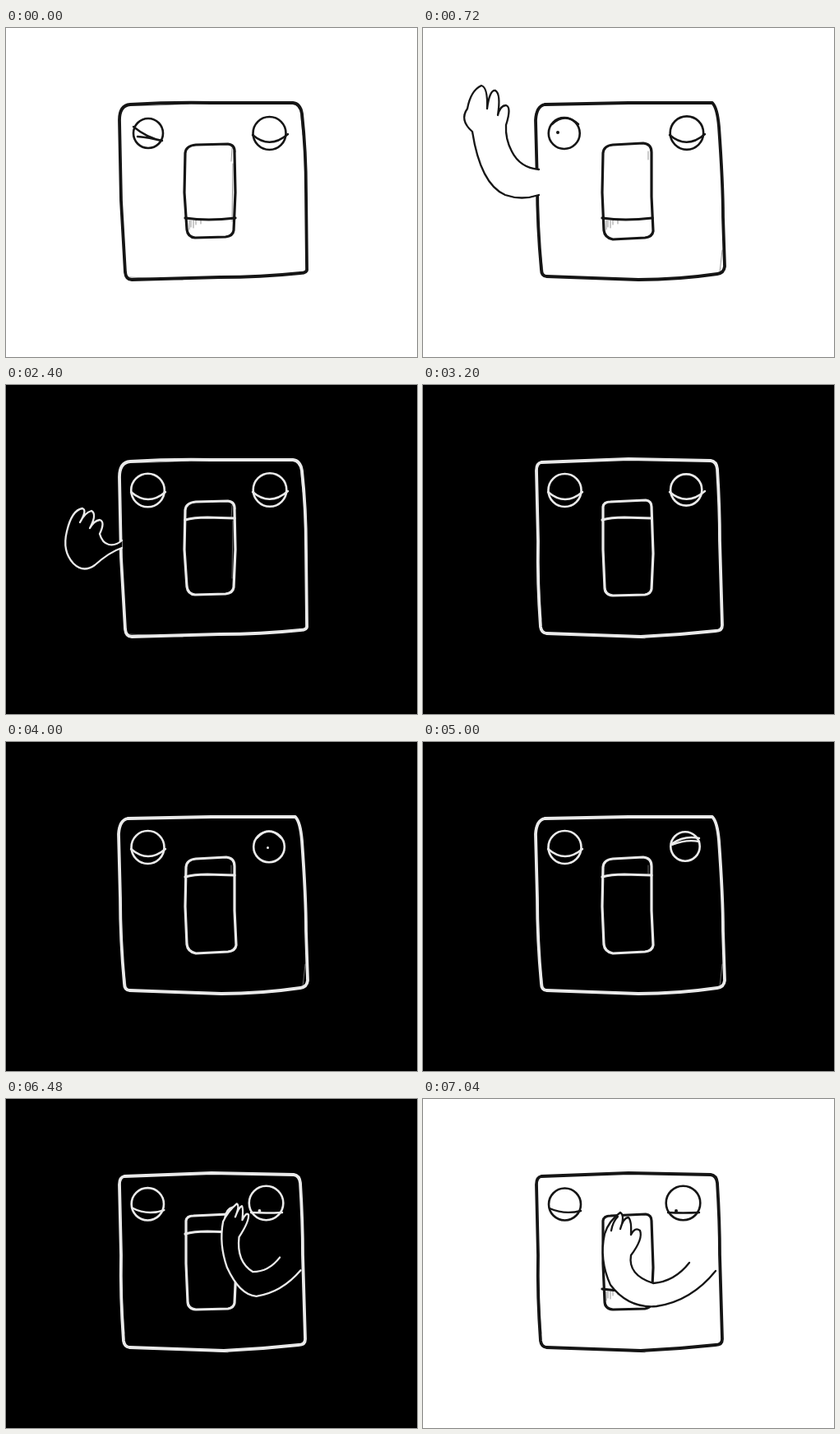
These frames come from a looping animation (500 px wide and 400 px high, 7.08 s). An HTML page without scripts:

```html
<!DOCTYPE html>
<html lang="en">
<head>
<meta charset="utf-8">
<title>Light switch</title>
<style>
html, body { margin: 0; width: 100%; height: 100%; overflow: hidden; background: #fff; }
svg { display: block; width: 500px; height: 400px; animation: light 7.08s step-end infinite; }
path, circle { fill: none; stroke: #151515; stroke-linecap: round; stroke-linejoin: round; }

/* room light and rocker */
@keyframes light { 0% { filter: invert(0) } 15.25% { filter: invert(1) } 95.48% { filter: invert(0) } }
@keyframes on { 0% { opacity: 1 } 15.25% { opacity: 0 } 95.48% { opacity: 1 } }
@keyframes off { 0% { opacity: 0 } 15.25% { opacity: 1 } 95.48% { opacity: 0 } }
.on { animation: on 7.08s step-end infinite; }
.off { animation: off 7.08s step-end infinite; }

/* three drawings of the plate take turns, 13 rounds per loop */
.plate { stroke-width: 3.8; }
.rocker { stroke-width: 3.2; }
.faint { stroke-width: 1; opacity: .45; }
.a, .b, .c { animation: a calc(7.08s / 13) step-end infinite; }
.b { animation-name: b; }
.c { animation-name: c; }
@keyframes a { 0% { opacity: 1 } 13% { opacity: 0 } 37.5% { opacity: 1 } 82% { opacity: 0 } }
@keyframes b { 0% { opacity: 0 } 13% { opacity: 1 } 37.5% { opacity: 0 } }
@keyframes c { 0% { opacity: 0 } 82% { opacity: 1 } }

/* eyes */
.ball { stroke-width: 2.6; }
.lid { stroke-width: 2.4; }
.dot { fill: #151515; stroke: none; r: 2px; }
.left {
  --shut: path("M152,130 Q173,148 194,130 M152,130 Q173,148 194,130");
  --open: path("M157,117 Q173,102 189,117 M157,117 Q173,102 189,117");
}
.right {
  --shut: path("M300,130 Q321,148 343,129 M300,130 Q321,148 343,129");
  --open: path("M305,117 Q320,100 335,117 M305,117 Q320,100 335,117");
}
.left .ball { animation: lball 7.08s infinite; }
.left .lid { animation: llid 7.08s infinite; }
.left .dot { animation: ldot 7.08s infinite; }
.right .ball { animation: rball 7.08s infinite; }
.right .lid { animation: rlid 7.08s infinite; }
.right .dot { animation: rdot 7.08s infinite; }

@keyframes lball {
  0% { cx: 173px; cy: 128px; r: 18px }
  19.2% { cx: 171.5px; cy: 128px; r: 19.2px }
  33.9% { cx: 172.5px; cy: 128px; r: 20.3px }
  56.5%, 70.6% { cx: 172.5px; cy: 128px; r: 20px }
  82.5% { cx: 171.5px; cy: 127px; r: 20.5px }
  99.4%, 100% { cx: 172.5px; cy: 128px; r: 19.5px }
}
@keyframes llid {
  0% { d: path("M155,120 Q172,134 190,137 M160,132 Q175,133 188,137") }
  3%, 16% { d: var(--open) }
  19.2% { d: path("M152,126 Q171,131 193,129 M152,126 Q171,131 193,129") }
  22.6%, 82.5% { d: var(--shut) }
  99.4%, 100% { d: path("M154,133 Q172,141 192,136 M154,133 Q172,141 192,136") }
}
@keyframes ldot {
  0%, 1.5% { cx: 173px; cy: 130px; opacity: 0 }
  3% { cx: 173px; cy: 128px; opacity: 1 }
  6%, 11% { cx: 164px; cy: 127px; opacity: 1 }
  15% { cx: 178px; cy: 131px; opacity: 1 }
  19.2%, 20% { cx: 171.5px; cy: 131px; opacity: 1 }
  21%, 100% { cx: 171.5px; cy: 135px; opacity: 0 }
}
@keyframes rball {
  0% { cx: 320.5px; cy: 128px; r: 20px }
  19.2%, 33.9% { cx: 321px; cy: 127.5px; r: 20.3px }
  56.5% { cx: 320px; cy: 127.5px; r: 18.8px }
  70.6% { cx: 319px; cy: 127px; r: 17.7px }
  82.5% { cx: 319.5px; cy: 127px; r: 18.7px }
  93%, 100% { cx: 316.5px; cy: 126.5px; r: 20.8px }
}
@keyframes rlid {
  0%, 51.4% { d: var(--shut) }
  54%, 68.5% { d: var(--open) }
  70.6%, 71.5% { d: path("M302,124 Q318,113 336,117 M303,125 Q320,118 336,121") }
  73.5%, 79% { d: var(--open) }
  81.5%, 84% { d: path("M302,137 Q319,137 337,136 M302,137 Q319,137 337,136") }
  93%, 99.99% { d: path("M298,138 Q316,139 336,138 M298,138 Q316,139 336,138") }
  100% { d: var(--shut) }
}
@keyframes rdot {
  0%, 52.5% { cx: 319px; cy: 128px; opacity: 0; r: 1.5px }
  54%, 57.5% { cx: 318.5px; cy: 128.5px; opacity: 1; r: 1.5px }
  59%, 61.5% { cx: 312px; cy: 129px; opacity: 1 }
  63%, 66% { cx: 327px; cy: 127px; opacity: 1 }
  68.5% { cx: 320px; cy: 120px; opacity: 1 }
  70%, 72% { cx: 320px; cy: 116px; opacity: 0 }
  74%, 79% { cx: 325px; cy: 128px; opacity: 1 }
  82.5%, 86% { cx: 323px; cy: 134px; opacity: 1 }
  93%, 99.99% { cx: 308px; cy: 136px; opacity: 1 }
  100% { cx: 319px; cy: 128px; opacity: 0 }
}

/* arms */
.arm { fill: #fff; stroke-width: 2.3; vector-effect: non-scaling-stroke; }
.larm {
  --out: path("M141,189 Q133,196 125,194 Q117,192 114,181 Q121,166 114,164 Q107,165 102,174 Q111,157 104,153 Q96,155 90,167 Q99,152 93,150 Q80,152 74,178 Q68,202 82,217 Q94,229 108,219 Q126,203 141,198");
  --up: path("M141,172 Q118,170 108,150 Q100,135 101,118 Q108,96 101,94 Q94,94 91,106 Q95,80 88,76 Q81,75 78,98 Q79,72 71,70 Q58,76 54,98 Q44,112 60,126 Q70,190 100,203 Q120,210 141,203");
  --press: path("M152,189 Q154,200 184,196 Q215,188 240,196 Q274,215 262,232 Q255,238 250,226 Q258,246 246,250 Q238,248 238,230 Q240,252 228,250 Q218,246 219,232 Q214,226 200,224 Q150,240 137,222 Q118,196 143,174");
  --droop: path("M153,190 Q155,204 184,204 Q231,202 250,228 Q266,269 241,273 Q236,272 246,250 Q242,267 231,267 Q226,266 233,248 Q229,268 219,267 Q214,264 219,254 Q216,240 204,232 Q150,243 137,225 Q118,196 141,174");
  transform-origin: 141px 194px;
  animation: larm 7.08s ease-in-out infinite;
}
@keyframes larm {
  0%, 1.7% { d: var(--out); transform: scale(0) }
  5.1% { d: var(--out); transform: scale(1) }
  9%, 11.3% { d: var(--up); transform: scale(1) }
  14.7%, 15.6% { d: var(--press); transform: scale(1) }
  19.2%, 22% { d: var(--droop); transform: scale(1) }
  29.9% { d: var(--out); transform: scale(.84) }
  31.9% { d: var(--out); transform: scale(1.3) }
  33.9% { d: var(--out); transform: scale(1) }
  36.7%, 100% { d: var(--out); transform: scale(0) }
}
.rarm {
  --wave: path("M365,170 Q368,168 371,161 Q390,140 391,90 Q396,72 404,72 Q412,75 409,84 Q412,77 417,81 Q421,87 416,92 Q421,84 424,90 Q424,97 416,96 Q417,110 413,130 Q405,180 377,197 Q368,198 367,206 M397,91 Q400,78 411,92");
  --tap: path("M324,199 Q306,222 280,224 Q249,214 253,190 Q268,170 264,160 Q258,155 253,165 Q254,148 250,144 Q244,144 240,158 Q246,142 240,138 Q226,148 221,164 Q214,195 228,226 Q250,255 284,252 Q326,246 356,209 M229,160 Q231,149 237,143");
  transform-origin: 367px 187px;
  animation: rarm 7.08s ease-in-out infinite;
}
@keyframes rarm {
  0%, 78% { d: var(--wave); transform: rotate(50deg) scale(0) }
  79.4% { d: var(--wave); transform: rotate(28deg) scale(1) }
  81.6%, 82.6% { d: var(--wave); transform: rotate(0deg) scale(1) }
  85% { d: var(--wave); transform: rotate(4deg) scale(1) }
  88.1% { d: var(--wave); transform: rotate(0deg) scale(1) }
  93.2%, 99.99% { d: var(--tap); transform: rotate(0deg) scale(1) }
  100% { d: var(--wave); transform: rotate(50deg) scale(0) }
}

/* chips thrown off the edge */
.chip { stroke-width: 1.8; animation: fly 7.08s linear infinite; }
@keyframes fly {
  0%, 78.5% { transform: translate(var(--from)); opacity: 0 }
  78.6% { transform: translate(var(--from)); opacity: 1 }
  82.5% { transform: translate(0px, 0px); opacity: 1 }
  86% { transform: translate(var(--to)); opacity: 1 }
  86.1%, 100% { transform: translate(var(--to)); opacity: 0 }
}
</style>
</head>
<body>
<svg viewBox="0 0 500 400">
  <rect width="500" height="400" fill="#fff"/>
  <g class="a">
    <path class="plate" d="M151,93 Q200,90 250,91 L349,91 Q358,92 360,104 Q365,150 365,200 L366,292 Q367,298 358,298 Q310,303 260,303 L153,306 Q146,306 145,297 L140,210 L138,112 Q138,94 151,93"/>
    <path class="faint" d="M147,94 Q180,95 222,92 M358,99 L361,130 M150,303 L215,306"/>
    <path class="rocker" d="M218,152 Q219,143 231,142 L270,141 Q279,142 278,152 L279,200 L277,246 Q276,253 267,254 L230,255 Q221,254 220,245 L217,200Z"/>
    <path class="faint" d="M275,146 L274,162 M276,165 L275,235"/>
  </g>
  <g class="b">
    <path class="plate" d="M148,93 Q200,92 250,91 L352,91 Q358,97 360,120 Q365,190 365,230 L367,290 Q366,298 358,299 Q310,306 262,306 L150,302 Q144,301 144,294 Q139,240 139,190 L137,112 Q138,95 148,93"/>
    <path class="faint" d="M141,260 L146,296 M364,270 L361,297"/>
    <path class="rocker" d="M219,152 Q220,143 231,142 L268,140 Q278,141 278,151 L278,205 L280,247 Q279,254 270,255 L231,257 Q221,255 220,246 L218,200Z"/>
    <path class="faint" d="M274,150 L274,160"/>
  </g>
  <g class="c">
    <path class="plate" d="M144,94 Q200,92 250,90 L350,92 Q357,93 358,102 Q361,150 361,190 L364,292 Q364,299 356,299 Q310,304 265,306 L150,302 Q144,301 143,294 Q139,240 140,190 L138,104 Q138,95 144,94"/>
    <path class="faint" d="M141,240 L144,285 M235,305 L270,308"/>
    <path class="rocker" d="M219,148 Q220,142 228,142 L271,140 Q278,141 278,148 L280,205 L278,248 Q277,254 270,255 L231,256 Q221,255 221,246 L219,200Z"/>
  </g>

  <g class="on">
    <path class="rocker" d="M218,231 Q245,235 279,231"/>
    <path class="faint" d="M223,234 v11 M225,234 v8 M228,234 v9 M231,234 v5 M237,234 v4"/>
  </g>
  <path class="off rocker" d="M218,164 Q228,161 245,161 L278,162"/>

  <g class="left">
    <circle class="ball" cx="173" cy="128" r="18"/>
    <path class="lid"/>
    <circle class="dot"/>
  </g>
  <g class="right">
    <circle class="ball" cx="320" cy="128" r="20"/>
    <path class="lid"/>
    <circle class="dot"/>
  </g>

  <path class="arm larm"/>
  <path class="arm rarm"/>
  <path class="chip" style="--from:-5px,57px;--to:18px,-12px" d="M367,133 q-2,-8 6,-8 q6,1 5,6 q-5,5 -6,1"/>
  <path class="chip" style="--from:-45px,0px;--to:34px,14px" d="M406,183 q8,-4 11,3 q2,5 -3,8 q-1,-7 -8,-11"/>
  <path class="chip" style="--from:-32px,-27px;--to:22px,46px" d="M399,205 q9,2 8,10 q-6,9 -17,3 q1,-6 9,-4z"/>
</svg>
</body>
</html>
```
